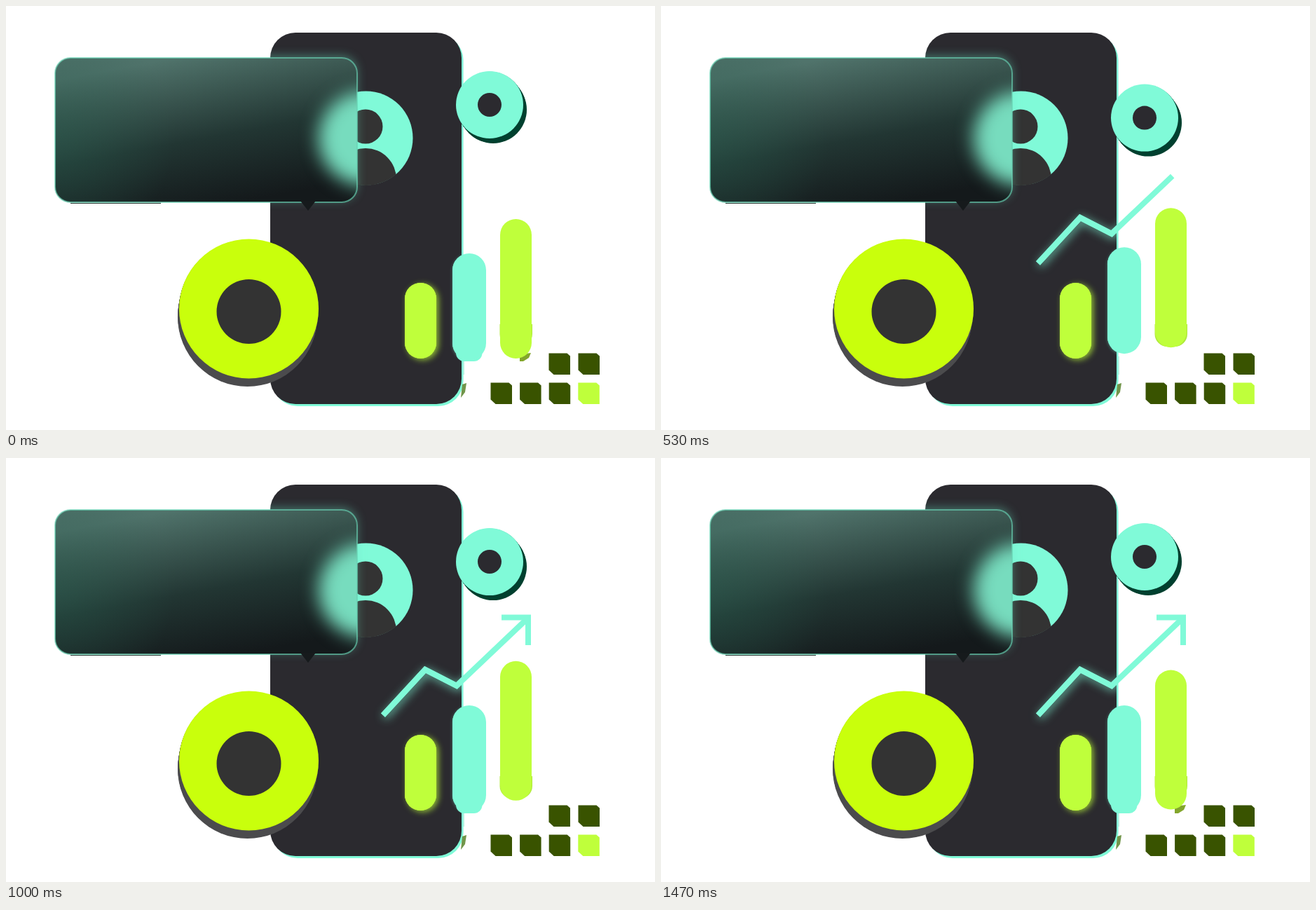
Animation of 926x605 px, one loop 1510 ms. Source, as an HTML page with a canvas:

```html
<!DOCTYPE html>
<html lang="en">
<head>
<meta charset="utf-8">
<title>Phone chart animation</title>
<style>
  html, body { margin: 0; width: 100%; height: 100%; overflow: hidden; background: #fff; }
  canvas { display: block; }
</style>
</head>
<body>
<canvas id="stage" width="926" height="605"></canvas>
<script>
const ctx = document.getElementById('stage').getContext('2d');
const LOOP = 1510;
const TEAL = '#80fad8', LIME = '#bfff3b', ACID = '#c9ff0c', DARK = '#2b2a2f', GREY = '#333333', OLIVE = '#395300';

const clamp01 = v => Math.max(0, Math.min(1, v));
// Smooth rise and return: 0 -> 1 -> 0
const swing = (t, start, length) =>
  (1 - Math.cos(2 * Math.PI * clamp01((t - start) / length))) / 2;

function roundRect(x, y, w, h, r) {
  ctx.beginPath();
  ctx.roundRect(x, y, w, h, r);
}

function fillRound(x, y, w, h, r, color) {
  roundRect(x, y, w, h, r);
  ctx.fillStyle = color;
  ctx.fill();
}

function disc(x, y, r, color) {
  ctx.beginPath();
  ctx.arc(x, y, r, 0, 2 * Math.PI);
  ctx.fillStyle = color;
  ctx.fill();
}

// Coin side: discs stacked along the offset
function coinEdge(x, y, r, dx, dy, color) {
  const steps = Math.ceil(Math.hypot(dx, dy));
  for (let i = 1; i <= steps; i++) disc(x + dx * i / steps, y + dy * i / steps, r, color);
}

function polygon(points, color) {
  ctx.beginPath();
  points.forEach(([x, y]) => ctx.lineTo(x, y));
  ctx.closePath();
  ctx.fillStyle = color;
  ctx.fill();
}

const phonePath = () => roundRect(377, 38, 273, 530, 36);

// Glows show only on the dark phone body
function withPhoneGlow(color, blur, dx, dy, draw) {
  ctx.save();
  phonePath();
  ctx.clip();
  ctx.shadowColor = color;
  ctx.shadowBlur = blur;
  ctx.shadowOffsetX = dx;
  ctx.shadowOffsetY = dy;
  draw();
  ctx.restore();
  draw();
}

function drawPhone() {
  fillRound(380, 41, 272.5, 530, 36, TEAL);
  ctx.fillStyle = '#b9f7e5';
  ctx.fillRect(652, 500, 2, 26);
  phonePath();
  ctx.fillStyle = DARK;
  ctx.fill();
  polygon([[651, 540], [657, 538], [655, 551], [649, 559]], '#71954a');
}

function drawAvatar() {
  disc(513.5, 188.5, 67, TEAL);
  ctx.save();
  ctx.beginPath();
  ctx.arc(513.5, 188.5, 67.5, 0, 2 * Math.PI);
  ctx.clip();
  disc(513, 172, 24.5, GREY);
  disc(513, 247, 44, GREY);
  ctx.restore();
}

function drawPanel() {
  const panelPath = () => roundRect(70, 74, 431, 206, 22);
  ctx.save();
  phonePath();
  ctx.clip();
  ctx.shadowColor = 'rgba(110,230,195,.4)';
  ctx.shadowBlur = 14;
  ctx.shadowOffsetY = -3;
  panelPath();
  ctx.fillStyle = '#22302f';
  ctx.fill();
  ctx.restore();

  ctx.save();
  panelPath();
  ctx.clip();
  const base = ctx.createLinearGradient(265, 70, 305, 285);
  base.addColorStop(0, '#50736b');
  base.addColorStop(.25, '#3b5751');
  base.addColorStop(.55, '#223633');
  base.addColorStop(1, '#14191b');
  ctx.fillStyle = base;
  ctx.fillRect(70, 74, 431, 206);

  const tint = ctx.createRadialGradient(70, 185, 0, 70, 185, 170);
  tint.addColorStop(0, 'rgba(38,88,74,.5)');
  tint.addColorStop(1, 'rgba(38,88,74,0)');
  ctx.fillStyle = tint;
  ctx.fillRect(70, 74, 190, 206);

  // Avatar seen through frosted glass
  ctx.filter = 'blur(13px)';
  disc(513, 189, 67, '#77dcbe');
  ctx.restore();

  panelPath();
  ctx.strokeStyle = 'rgba(105,211,180,.65)';
  ctx.lineWidth = 2;
  ctx.stroke();
  ctx.fillStyle = '#24352f';
  ctx.fillRect(92, 281, 129, 1);
  polygon([[420, 278], [442, 278], [431, 292]], '#161a1c');
}

function drawBigCoin() {
  coinEdge(346.5, 432, 99.5, -2, 11.5, '#4b4b4d');
  disc(346.5, 432, 99.5, ACID);
  disc(346.5, 436, 46, GREY);
}

function drawSmallCoin(t) {
  const y = 141 + 20 * swing(t, 20, 1230);
  coinEdge(690, y, 48, 5, 7, '#00402f');
  disc(690, y, 48, TEAL);
  disc(690, y, 17, DARK);
}

function thirdBarLift(t) {
  if (t < 340) return 0;
  if (t < 650) return 18.5 * (1 - (1 - (t - 340) / 310) ** 2);
  return 18.5 * (1 - clamp01((t - 650) / 865) ** 1.6);
}

function drawBars(t) {
  const lift1 = 20 * swing(t, 0, 430);
  withPhoneGlow('rgba(191,255,59,.7)', 8, 3, 2,
    () => fillRound(569, 395 - lift1, 45, 108, 22.5, LIME));

  const lift2 = 20 * swing(t, 159, 484);
  if (lift2 < 2) fillRound(642, 476, 37.5, 31, 12, TEAL);
  withPhoneGlow('rgba(128,250,216,.4)', 4, 0, 1,
    () => fillRound(637, 353 - lift2, 48, 152, 24, TEAL));

  const lift3 = thirdBarLift(t);
  if (lift3 < 4) polygon([[733, 497], [749, 495], [746, 502], [738, 507], [733, 507]], '#83a62c');
  fillRound(704.5, 454, 46.5, 32, [0, 0, 18, 18], '#afe83c');
  fillRound(705, 304 - lift3, 45, 199, 22.5, LIME);
}

const TREND = [[538, 367], [598, 302], [643, 325], [744, 229]];

function traceTrend(length) {
  ctx.beginPath();
  ctx.moveTo(...TREND[0]);
  for (let i = 1; i < TREND.length && length > 0; i++) {
    const [x0, y0] = TREND[i - 1], [x1, y1] = TREND[i];
    const size = Math.hypot(x1 - x0, y1 - y0);
    const part = Math.min(1, length / size);
    ctx.lineTo(x0 + (x1 - x0) * part, y0 + (y1 - y0) * part);
    length -= size;
  }
}

function drawTrend(t) {
  const u = t - 103;
  if (u <= 0) return;
  const head = clamp01((t - 560) / 60);
  withPhoneGlow('rgba(128,250,216,.75)', 13, 2, 3, () => {
    ctx.strokeStyle = TEAL;
    ctx.lineWidth = 8;
    ctx.lineJoin = 'miter';
    traceTrend(u * (.552 + .000122 * u));
    ctx.stroke();
    if (!head) return;
    ctx.beginPath();
    ctx.moveTo(745 - 38 * head, 227.5);
    ctx.lineTo(745, 227.5);
    ctx.lineTo(745, 227.5 + 39.5 * head);
    ctx.stroke();
  });
}

function drawTiles() {
  const tile = (x, y, color) => polygon([
    [x, y], [x + 26, y], [x + 30.5, y + 4],
    [x + 30.5, y + 30.5], [x + 7, y + 30.5], [x, y + 24]
  ], color);
  tile(774.5, 495.5, OLIVE);
  tile(816.5, 495.5, OLIVE);
  for (let i = 0; i < 4; i++) tile(691.5 + i * 41.6, 537.5, i < 3 ? OLIVE : LIME);
}

function render(now) {
  const t = now % LOOP;
  ctx.fillStyle = '#fff';
  ctx.fillRect(0, 0, 926, 605);
  drawPhone();
  drawAvatar();
  drawPanel();
  drawBigCoin();
  drawTrend(t);
  drawBars(t);
  drawSmallCoin(t);
  drawTiles();
}

const startTime = performance.now();
function tick() {
  render(performance.now() - startTime);
  requestAnimationFrame(tick);
}
tick();
</script>
</body>
</html>
```
